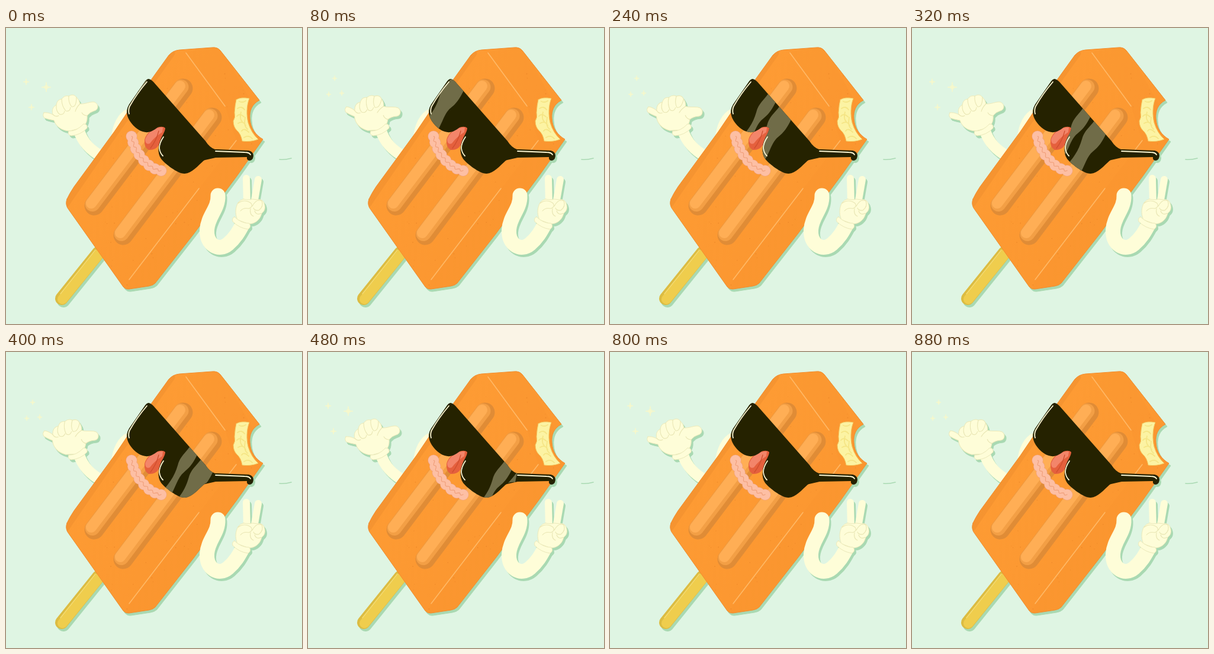
Write an HTML page that moves like this. It is 500 by 500 pixels and loops after 0.96 s.

```html
<!DOCTYPE html>
<html lang="en">
<head>
<meta charset="utf-8">
<title>Cool ice pop</title>
<style>
html, body { margin: 0; width: 100%; height: 100%; overflow: hidden; background: #dff5e3; }
svg { display: block; width: 100vw; height: 100vh; }
path, line { stroke-linecap: round; stroke-linejoin: round; }
.shade { filter: drop-shadow(3px 4px 0 #a9d9b2); }
.limb { fill: none; stroke: #fefdd8; }
.fold { fill: none; stroke: #e9e6b4; stroke-width: 1.1; }
.skin { fill: #fefdd8; stroke: #ebe9ba; stroke-width: 1; }
.seam { fill: none; stroke: #ffb966; stroke-width: 1.6; }
.shine { fill: none; stroke: #fbf6d4; stroke-width: 1.8; }
</style>
</head>
<body>
<svg viewBox="0 0 500 500">
  <defs>
    <path id="body" d="M103 289 Q107 280 115 268 L183 175 L208 138 L239 96 L275 46 Q282 38 293 37 L348 33
      Q357 32 362 38 L428 122 C415 129 411 140 412 153 C413 170 422 181 434 188 L390 250 L317 348 L252 431
      Q248 435 241 436 L208 441 Q202 442 198 437 L104 304 Q100 297 103 289Z"/>
    <path id="lens" d="M240 86 Q244 86 249 91 L337 191 Q344 202 353 205 L350 220 Q340 219 334 224
      C324 233 314 245 302 246 C291 247 268 229 262 221 C255 211 257 196 263 184 Q269 174 269 169
      Q265 165 256 168 C247 175 240 178 231 175 C220 172 208 159 205 148 Q202 139 208 129 L235 90 Q237 87 240 86Z"/>
    <clipPath id="bodyClip"><use href="#body"/></clipPath>
    <clipPath id="lensClip"><use href="#lens"/></clipPath>
    <linearGradient id="orange" x1="0" y1="0" x2="1" y2="1">
      <stop offset="0" stop-color="#ff9e36"/><stop offset="1" stop-color="#fa942e"/>
    </linearGradient>
  </defs>

  <path d="M462 222 Q471 223 482 220" fill="none" stroke="#a9d9b2" stroke-width="1.6"/>
  <g id="stars" fill="#f5f8cd"></g>

  <g class="shade">
    <!-- left arm -->
    <path class="limb" stroke-width="19" d="M123 173 C130 194 143 207 162 217"/>
    <path class="limb" stroke-width="17" d="M205 146 C191 156 187 174 185 194"/>
    <g id="shaka">
      <path class="skin" d="M64 143 Q70 142 79 146 C77 139 79 133 85 130 Q86 121 94 120 Q99 113 106 115
        Q114 110 119 117 Q124 121 125 128 C134 129 141 124 149 125 C157 128 157 138 149 140
        Q142 142 137 148 C138 158 134 166 126 169 L108 174 C94 174 84 166 81 156 Q70 154 65 152 Q61 148 64 143Z"/>
      <path class="fold" d="M79 146 Q84 151 89 148 M85 130 Q84 141 91 146 Q98 147 99 140 M94 120 Q94 132 101 140
        Q108 142 109 134 M106 115 Q105 126 111 133 Q119 134 119 117 M125 128 Q119 134 117 141 M137 148 Q131 148 128 143"/>
    </g>
    <path class="skin" d="M106 174 Q119 175 131 162 Q138 162 137 169 Q126 181 110 182 Q103 180 106 174Z"/>

    <!-- stick -->
    <path d="M156 380 L94 457" fill="none" stroke="#dcbc42" stroke-width="22"/>
    <path d="M158 381 L95.5 458" fill="none" stroke="#efcd4d" stroke-width="17"/>
    <path d="M151 375 L92 449" fill="none" stroke="#f5dc72" stroke-width="1.4"/>

    <!-- ice -->
    <use href="#body" fill="url(#orange)"/>
    <g clip-path="url(#bodyClip)">
      <path d="M303 40 L370 132 L389 190 L208 425 L203 445 L260 440 L450 190 L362 30Z" fill="#f08a28" opacity=".15"/>
      <path d="M100 296 L183 175 L278 42" fill="none" stroke="#e6872c" stroke-width="15" opacity=".35"/>
      <g id="specks" fill="#d97420" opacity=".4"></g>
      <g id="grooves"></g>
      <path class="seam" d="M304 42 L370 132 M389 190 L372 212 M326 271 L208 425"/>
    </g>
    <use href="#body" fill="none" stroke="#f18b2c" stroke-width="1"/>
    <path d="M389 121 Q397 116 411 119 C406 131 406 148 409 160 Q414 177 426 188 Q413 193 399 191
      Q397 179 390 173 Q384 167 384 157 Q388 151 386 143 Q387 129 389 121Z" fill="#fcf3a3" stroke="#f3c962"/>
    <path d="M394 124 Q400 127 405 123 M391 136 Q398 131 403 138 M390 149 Q395 143 402 150 M392 161 Q401 156 405 165
      M398 174 Q402 168 410 176 M402 185 Q410 180 416 187 M397 142 Q394 154 399 158 M404 151 Q401 166 408 171"
      fill="none" stroke="#f5e585" stroke-width="1.8"/>

    <!-- right arm -->
    <path class="limb" stroke-width="25" d="M358 283 C359 306 341 317 339.5 341 C338 367 360 378 375 365 C387 355 393 344 399 333"/>
    <g transform="translate(-1 0)">
      <path class="limb" stroke-width="12" d="M407 254 L408 296 M427 256 L420 296"/>
      <path class="skin" d="M402 289 Q412 291 417 289 L425 290 Q436 288 438 299 Q440 308 433 313
        C430 325 421 331 411 331 L392 324 C387 313 389 302 393 295 Q397 290 402 289Z"/>
      <path class="fold" d="M393 296 Q404 288 415 296 Q419 302 411 305 Q402 303 397 309 M417 301 Q424 288 433 292
        Q437 301 428 308 Q421 309 419 304 M421 309 Q424 317 432 313 M414 305 Q412 315 419 318"/>
      <path class="skin" d="M387 319 Q398 330 412 330 Q416 336 410 340 Q395 338 384 327 Q382 321 387 319Z"/>
    </g>

    <!-- face -->
    <g id="mouth"></g>
    <path d="M269 167 C251 165 237 176 234 189 Q233 202 241 206 Q252 207 258 198 L269 180Z" fill="#e5603d"/>
    <path d="M265 168 C250 167 238 178 235 189 Q236 198 243 195 Q251 184 264 176Z" fill="#f3856a"/>
    <path d="M258 174 Q254 190 244 203" fill="none" stroke="#cf4f30" stroke-width="1.3"/>

    <!-- glasses -->
    <path d="M338 204 Q350 205 358 205 L410 207 Q418 209 418 216 Q417 224 411 224 Q406 223 407 218 L354 219 L332 224Z" fill="#252200"/>
    <use href="#lens" fill="#252200"/>
    <g clip-path="url(#lensClip)">
      <g id="glint" fill="#706c48">
        <path d="M10 -150 C15 -120 4 -110 10 -92 S14 -60 10 -35 H26 C31 -60 20 -75 26 -92 S32 -120 26 -150Z"/>
        <path d="M38 -150 C44 -120 32 -110 38 -92 S43 -60 38 -35 H66 C71 -60 60 -75 66 -92 S71 -120 66 -150Z"/>
      </g>
    </g>
    <path class="shine" d="M238 91 Q221 111 209 132 Q206 138 208 145 M266 184 Q259 194 259 203 Q260 211 265 216"/>
    <path class="shine" stroke-width="1.4" d="M354 208 L403 210 Q411 210 413 214"/>
  </g>
</svg>
<script>
const NS = "http://www.w3.org/2000/svg";
const $ = id => document.getElementById(id);
const LOOP = 960, STEP = 80;

function add(parent, tag, attrs) {
  const el = document.createElementNS(NS, tag);
  for (const k in attrs) el.setAttribute(k, attrs[k]);
  parent.appendChild(el);
  return el;
}

// Rounded grooves: dark wall, lit wall, lighter rim
function groove(x1, y1, x2, y2) {
  const bar = (dx, dy, stroke, width) => add($("grooves"), "line", {
    x1: x1 + dx, y1: y1 + dy, x2: x2 + dx, y2: y2 + dy, stroke, "stroke-width": width
  });
  bar(0, 0, "#e08c36", 33);
  bar(-3, -2.5, "#f39f45", 25);
  bar(-5, -4, "#ffae55", 18);
}
groove(299, 102, 149, 300);
groove(348, 151, 198, 350);

let seed = 7;
const rand = () => (seed = seed * 16807 % 2147483647) / 2147483647;
for (let i = 0; i < 140; i++) {
  add($("specks"), "circle", { cx: 100 + rand() * 335, cy: 35 + rand() * 405, r: 0.4 + rand() * 0.5 });
}

// Scalloped lips along a cubic curve
function lip(t) {
  const u = 1 - t;
  const mix = (a, b, c, d) => u * u * u * a + 3 * u * u * t * b + 3 * u * t * t * c + t * t * t * d;
  return [mix(212, 216, 236, 262), mix(183, 206, 237, 241)];
}
function lips(extra, fill) {
  for (let i = 0; i <= 7; i++) {
    const [cx, cy] = lip(i / 7);
    add($("mouth"), "circle", { cx, cy, r: 9 + extra, fill });
  }
}
lips(0.6, "#f0a07c");
lips(0, "#fdbfa4");
let wave = "";
for (let i = 0; i <= 56; i++) {
  const [x, y] = lip(i / 56), k = 1.8 * Math.sin(i * 0.9);
  wave += (i ? "L" : "M") + (x + k * 0.75).toFixed(1) + " " + (y - k * 0.66).toFixed(1);
}
add($("mouth"), "path", { d: wave, fill: "none", stroke: "#f0a07c", "stroke-width": 1.2 });

const star = (x, y, r) =>
  `M${x} ${y - r}Q${x} ${y} ${x + r} ${y}Q${x} ${y} ${x} ${y + r}Q${x} ${y} ${x - r} ${y}Q${x} ${y} ${x} ${y - r}Z`;
const starSets = [
  [[68, 100, 8], [34, 91, 5], [43, 134, 5]],
  [[45, 85, 4], [35, 112, 4], [57, 110, 4]]
].map(set => add($("stars"), "path", {
  d: set.map(s => star(...s)).join(""), stroke: "#f5f8cd", "stroke-width": 1
}));

function draw(time) {
  const n = Math.floor(time % LOOP / STEP), odd = n % 2;
  $("shaka").setAttribute("transform", `rotate(${odd * 13} 108 142)`);
  starSets.forEach((s, i) => s.setAttribute("visibility", i === odd ? "visible" : "hidden"));
  // Slanted bands slide along the lens axis, pivoting about its middle
  $("glint").setAttribute("transform",
    `rotate(48.7) translate(${162 + n * 32.6} -92) skewX(17) translate(0 92)`);
}

const start = performance.now();
function tick() {
  draw(performance.now() - start);
  requestAnimationFrame(tick);
}
tick();
</script>
</body>
</html>
```
